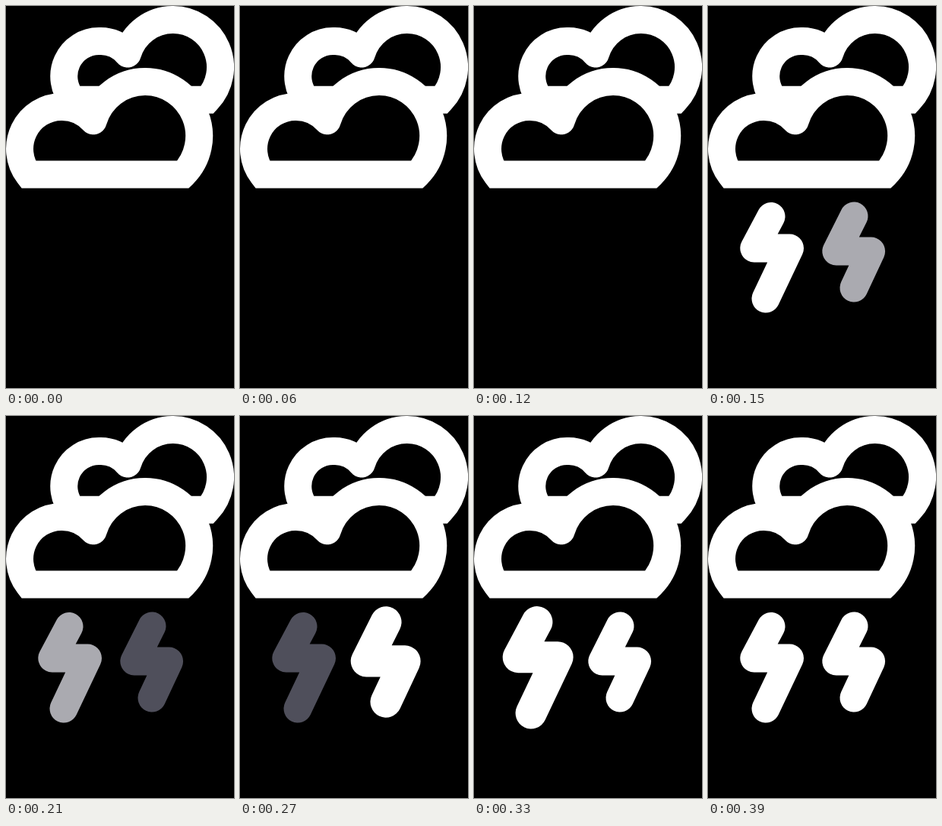
An HTML page for the animation above (900 ms loop, 300 by 500 pixels).

```html
<!DOCTYPE html>
<html lang="en">
<head>
<meta charset="utf-8">
<title>Thunderstorm</title>
<style>
  html, body { margin: 0; height: 100%; overflow: hidden; background: #000; }
  svg { display: block; width: 300px; height: 500px; stroke: #fff; stroke-linecap: round; }
  .cloud { fill: #000; stroke-width: 36; }
  .bolt { fill: none; stroke-width: 37; stroke-linejoin: round; }
</style>
</head>
<body>
<svg viewBox="0 0 300 500">
  <path class="cloud" d="M160 62.500A62 62 0 0 1 220 18A62 62 0 0 1 265 122.700H88A46 46 0 0 1 123 46A46 46 0 0 1 160 62.500"/>
  <path class="cloud" d="M114.800 150.300A71 71 0 0 1 183 99A71 71 0 0 1 233 220.600H29.500A55 55 0 0 1 73 132A55 55 0 0 1 114.800 150.300"/>
  <g id="bolts">
    <path class="bolt" d="M83 275.500L60.800 317H107.500L76 383"/>
    <path class="bolt" d="M192 275L168.800 321H214.600L192 369"/>
  </g>
</svg>
<script>
const LOOP = 900, STEP = 30, FLASHES = 7;

// The looks a bolt runs through, one per flash.
const looks = [
  { scale: 1.11, color: '#fff' },
  { scale: 1, color: '#fff' },
  { scale: 1, color: '#aaaab0' },
  { scale: 1, color: '#4f4f5b' },
];
const STEADY = 1;

const group = document.getElementById('bolts');
const [left, right] = group.children;
const bolts = [
  { el: left, cx: 84, cy: 329, lag: 3 },
  { el: right, cx: 192, cy: 322, lag: 0 },
];

function drawBolt({ el, cx, cy, lag }, flash) {
  const settled = flash >= FLASHES - 1;
  const { scale, color } = looks[settled ? STEADY : (flash + lag) % looks.length];
  el.style.stroke = color;
  el.setAttribute('transform', `translate(${cx} ${cy}) scale(${scale}) translate(${-cx} ${-cy})`);
}

// Flashes alternate with darkness until the last one, which stays lit.
function draw() {
  const step = Math.min(Math.floor(performance.now() % LOOP / STEP), 2 * FLASHES - 1);
  const lit = step % 2 === 1;
  group.style.visibility = lit ? 'visible' : 'hidden';
  if (lit) bolts.forEach(bolt => drawBolt(bolt, (step - 1) / 2));
  requestAnimationFrame(draw);
}
draw();
</script>
</body>
</html>
```
